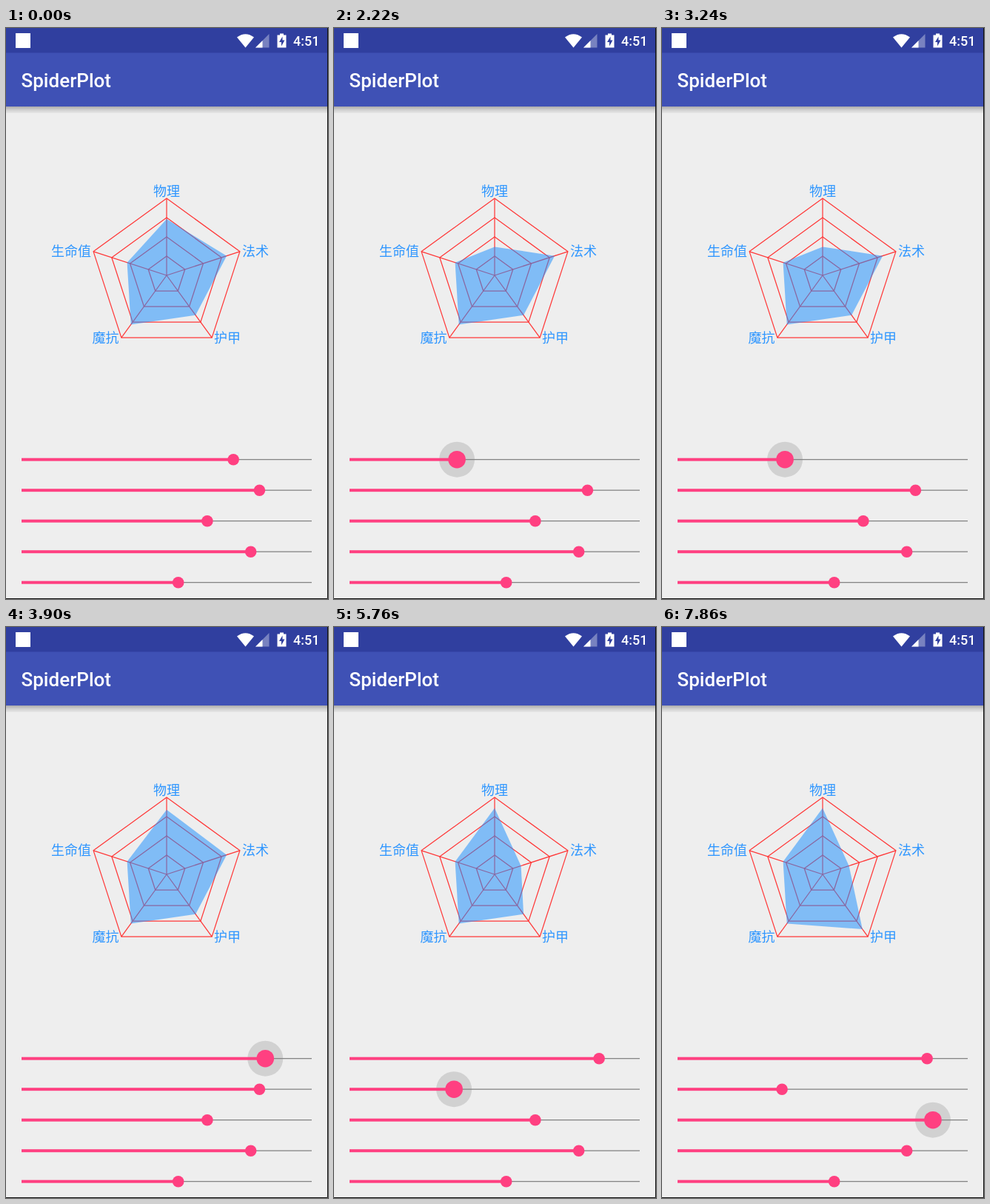
An HTML page for the animation above (8 s loop, 435 by 771 pixels).

```html
<!DOCTYPE html>
<html lang="zh-CN">
<head>
<meta charset="utf-8">
<title>SpiderPlot</title>
<style>
  html, body { margin: 0; width: 100%; height: 100%; overflow: hidden; background: #eee; }
  svg { display: block; width: 435px; height: 771px; }
  .ui { font-family: Roboto, sans-serif; font-weight: 500; fill: #fff; }
  .label { font: 18px "Noto Sans CJK SC", "Noto Sans CJK", sans-serif; fill: #2e96ff; text-anchor: middle; }
</style>
</head>
<body>
<svg id="stage" viewBox="0 0 435 771">
  <defs>
    <linearGradient id="shade" x2="0" y2="1">
      <stop offset="0" stop-opacity=".28"/>
      <stop offset=".5" stop-opacity=".13"/>
      <stop offset="1" stop-opacity=".03"/>
    </linearGradient>
  </defs>
  <rect width="435" height="771" fill="#eee"/>
  <rect y="106" width="435" height="9" fill="url(#shade)"/>
  <rect y="33" width="435" height="73" fill="#3f51b5"/>
  <rect width="435" height="33.5" fill="#303f9f"/>

  <rect x="13" y="7" width="20" height="20" fill="#fff"/>
  <path d="M312 12.5Q323.500 4 335 12.500L323.500 26.500Z" fill="#fff"/>
  <path d="M355.500 8V26.500H337Z" fill="#fff" fill-opacity=".35"/>
  <path d="M346.500 17V26.500H337Z" fill="#fff"/>
  <path d="M370 7.500h5v2h3.500v17h-12v-17h3.500z" fill="#fff"/>
  <path d="M373.500 11.500v5h3l-4.500 8v-5.500h-3z" fill="#303f9f"/>
  <text class="ui" x="388" y="24" font-size="18">4:51</text>
  <text class="ui" x="20.500" y="80" font-size="26">SpiderPlot</text>

  <g id="web" fill="none" stroke="#ff3838" stroke-width="1.25"></g>
  <polygon id="area" fill="#1e90ff" fill-opacity=".52"/>
  <g id="labels"></g>
  <g id="sliders"></g>
  <path d="M434.500 0V770.500H0" fill="none" stroke="#111"/>
</svg>
<script>
const LOOP = 8000, STEP = 60;
const CENTER = { x: 217, y: 334 }, RADIUS = 104;
const TRACK = { x: 21, width: 392, y: 582.7, gap: 41.5 };

// keys: [ms, percent]; press and release: ms of the touch
const sliders = [
  { press: 1320, release: 4260, keys: [[1260, 73], [1320, 72], [1440, 71], [2100, 49], [2220, 37],
    [2700, 13], [2820, 13], [3240, 37], [3660, 69], [3900, 84], [4080, 86]] },
  { press: 4980, release: 6300, keys: [[4920, 82], [4980, 81], [5100, 79], [5400, 59], [5700, 38], [5760, 36]] },
  { press: 7380, release: Infinity, keys: [[7320, 64], [7380, 65], [7620, 78], [7860, 88]] },
  { press: Infinity, release: Infinity, keys: [[0, 79]] },
  { press: Infinity, release: Infinity, keys: [[0, 54]] }
];
const labels = [['物理', 217, 220], ['法术', 337, 301.5], ['护甲', 299, 418], ['魔抗', 134.500, 418], ['生命值', 88, 301.5]];

const $ = id => document.getElementById(id);
const clamp = v => Math.max(0, Math.min(1, v));

function add(parent, tag, attrs) {
  const el = document.createElementNS('http://www.w3.org/2000/svg', tag);
  set(el, attrs);
  return parent.appendChild(el);
}

function set(el, attrs) {
  for (const name in attrs) el.setAttribute(name, attrs[name]);
}

function corner(i, share) {
  const angle = i * Math.PI * 2 / 5;
  return [CENTER.x + Math.sin(angle) * RADIUS * share, CENTER.y - Math.cos(angle) * RADIUS * share];
}

const pentagon = shares => shares.map((share, i) => corner(i, share).join()).join(' ');

// Monotone cubic interpolation through the keys
function valueAt(keys, t) {
  const last = keys.length - 1;
  if (t <= keys[0][0]) return keys[0][1];
  if (t >= keys[last][0]) return keys[last][1];
  const slope = i => (keys[i + 1][1] - keys[i][1]) / (keys[i + 1][0] - keys[i][0]);
  const tangent = i => {
    if (i === 0 || i === last) return 0;
    const a = slope(i - 1), b = slope(i);
    return a * b <= 0 ? 0 : 2 * a * b / (a + b);
  };
  const i = keys.findIndex(key => key[0] > t) - 1;
  const [t0, v0] = keys[i], [t1, v1] = keys[i + 1];
  const span = t1 - t0, u = (t - t0) / span, w = 1 - u;
  return v0 * (1 + 2 * u) * w * w + v1 * u * u * (3 - 2 * u)
    + span * u * w * (tangent(i) * w - tangent(i + 1) * u);
}

for (const share of [.25, .5, .75, 1]) add($('web'), 'polygon', { points: pentagon(Array(5).fill(share)) });
for (let i = 0; i < 5; i++) add($('web'), 'path', { d: `M${CENTER.x} ${CENTER.y}L${corner(i, 1)}` });

for (const [text, x, y] of labels) {
  add($('labels'), 'text', { class: 'label', x, y: y + 6.5 }).textContent = text;
}

sliders.forEach((slider, i) => {
  const y = TRACK.y + TRACK.gap * i, group = $('sliders');
  slider.ripple = add(group, 'circle', { cy: y, r: 24, opacity: 0 });
  add(group, 'rect', { x: TRACK.x, y: y - .7, width: TRACK.width, height: 1.3, fill: '#858585' });
  slider.bar = add(group, 'rect', { x: TRACK.x, y: y - 2, height: 4, fill: '#ff4081' });
  slider.thumb = add(group, 'circle', { cy: y, fill: '#ff4081' });
});

function render(time) {
  const t = Math.floor(time % LOOP / STEP) * STEP;
  const shares = sliders.map(({ keys, press, release, ripple, bar, thumb }) => {
    const share = Math.round(valueAt(keys, t)) / 100;
    const cx = TRACK.x + TRACK.width * share;
    const released = t >= release ? t - release + STEP : 0;
    const grown = t >= press ? clamp((t - press + 30) / 150) * (1 - clamp(released / 120)) : 0;
    const glow = clamp((t - press) / 120) * (1 - clamp(released / 420));
    set(ripple, { cx, opacity: .12 * glow });
    set(bar, { width: cx - TRACK.x });
    set(thumb, { cx, r: 7.8 + 4 * grown });
    return share;
  });
  set($('area'), { points: pentagon(shares) });
}

const start = performance.now();
function tick() {
  render(performance.now() - start);
  requestAnimationFrame(tick);
}
tick();
</script>
</body>
</html>
```
